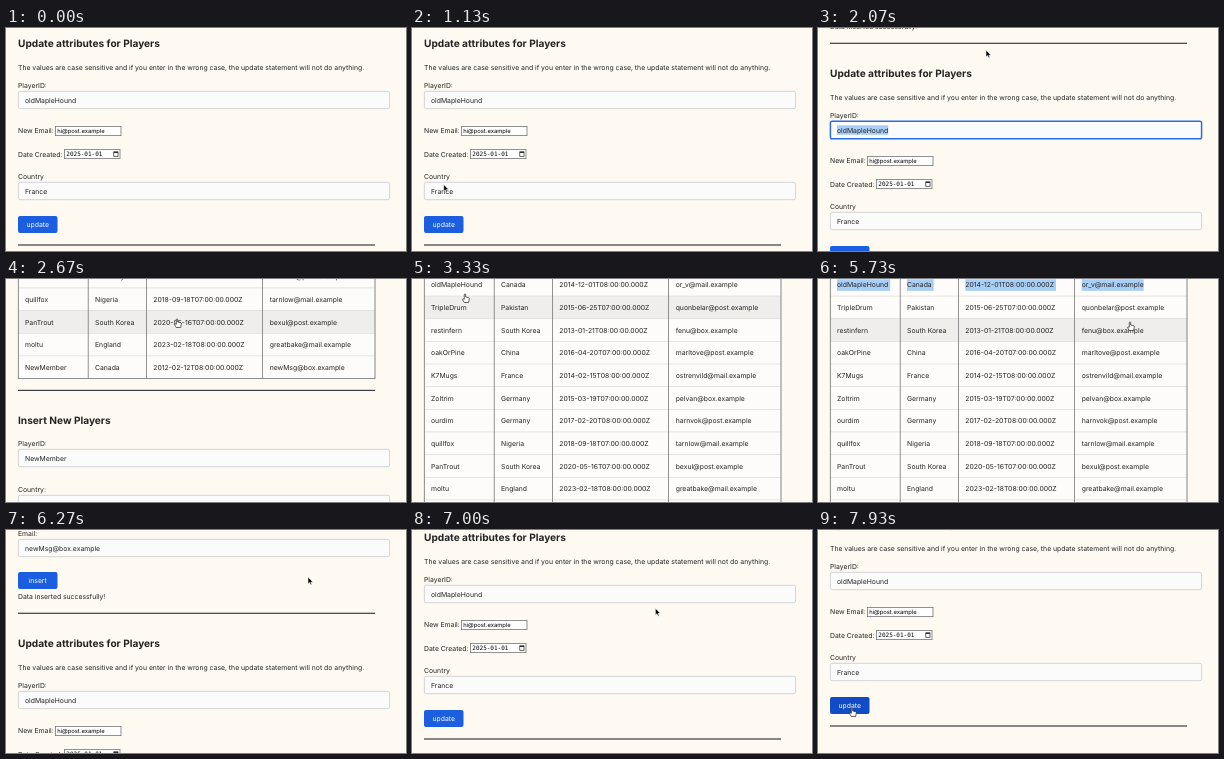
Animation, 400 px wide and 223 px high, one loop 8 s. Source, as an HTML page:

```html
<!DOCTYPE html>
<html lang="en">
<head>
<meta charset="utf-8">
<title>Player admin</title>
<style>
  html, body { margin: 0; width: 100%; height: 100%; overflow: hidden; background: #fefaf1; }
  svg { display: block; width: 100vw; height: 100vh; }
  text { font: 6.84px Inter, "Open Sans", sans-serif; fill: #232323; white-space: pre; text-rendering: geometricPrecision; }
  .title { font-size: 10.15px; font-weight: 700; }
  .small { font-size: 5.85px; fill: #000; }
  .mono { font: 6px "DejaVu Sans Mono", monospace; fill: #000; }
  .caption { fill: #fff; }
</style>
</head>
<body>
<svg id="stage" viewBox="0 0 400 223">
  <g id="page"></g>
  <g id="cursor" stroke-linejoin="round">
    <path id="arrow" d="M0 0V7L1.6 5.6 2.7 8 3.8 7.5 2.8 5.2H5Z" fill="#000" stroke="#fff" stroke-width=".6"/>
    <path id="hand" d="M-.7 .3Q0-.5 .7 .3V3L3.7 3.7Q4.5 4 4.3 5L3.6 8.5H-.7L-2.6 5.4Q-2.4 4.3-.7 5.3Z" fill="#fff" stroke="#222" stroke-width=".7"/>
  </g>
</svg>
<script>
const LOOP = 8000, ROW = 22.65, FIRST_ROW = -511.2;
const SELECTED = '#a9cff7';
const $ = id => document.getElementById(id);
const page = $('page');

function add(tag, attrs, content) {
  const el = document.createElementNS('http://www.w3.org/2000/svg', tag);
  for (const key in attrs) el.setAttribute(key, attrs[key]);
  if (content) el.textContent = content;
  return page.appendChild(el);
}
const box = (x, y, width, height, fill, more) => add('rect', { x, y, width, height, fill, ...more });
const label = (x, middle, content, cls = '') => add('text', { x, y: middle + 2.5, class: cls }, content);
const title = (middle, content) => add('text', { x: 12, y: middle + 3.3, class: 'title' }, content);
const rule = y => box(12, y - .6, 357, 1.2, '#3c3c42');

function field(middle, name, value) {
  label(12, middle, name);
  const frame = box(12.4, middle + 6.3, 371.2, 17.4, '#fbfbfc', { rx: 1.8, stroke: '#cfd0d6', 'stroke-width': .9 });
  const mark = box(19, middle + 10.3, 0, 9.5, SELECTED);
  return { frame, mark, text: label(19, middle + 15, value) };
}
function smallBox(x, middle, width) {
  box(x, middle - 4.6, width, 9.2, '#fff', { stroke: '#777', 'stroke-width': .8 });
}
function dateField(middle, value) {
  label(12, middle, 'Date Created:');
  smallBox(58.5, middle, 55.5);
  add('text', { x: 60.3, y: middle + 2.1, class: 'mono' }, value);
  box(107.8, middle - 2.1, 4.2, 4.4, 'none', { stroke: '#222', 'stroke-width': .7 });
  box(107.8, middle - 2.3, 4.2, 1.2, '#222');
}
function button(top, content) {
  const face = box(12, top, 39.5, 17, '#1b5fe0', { rx: 2 });
  add('text', { x: 31.7, y: top + 10.9, class: 'caption', 'text-anchor': 'middle' }, content);
  return face;
}

const columns = [12.3, 82.2, 140.6, 256.6, 369];
const textX = [19, 89, 147.3, 263.7];
const players = [
  ['oldMapleHound', 'Canada', '2014-12-01T08', 'or_v@mail.example'],
  ['TripleDrum', 'Pakistan', '2015-06-25T07', 'quonbelar@post.example'],
  ['restinfern', 'South Korea', '2013-01-21T08', 'fenu@box.example'],
  ['oakOrPine', 'China', '2016-04-20T07', 'marltove@post.example'],
  ['K7Mugs', 'France', '2014-02-15T08', 'ostrenvild@mail.example'],
  ['Zoltrim', 'Germany', '2015-03-19T07', 'pelvan@box.example'],
  ['ourdim', 'Germany', '2017-02-20T08', 'harnvok@post.example'],
  ['quillfox', 'Nigeria', '2018-09-18T07', 'tarnlow@mail.example'],
  ['PanTrout', 'South Korea', '2020-05-16T07', 'bexul@post.example'],
  ['moltu', 'England', '2023-02-18T08', 'greatbake@mail.example'],
  ['NewMember', 'Canada', '2012-02-12T08', 'newMsg@box.example']
];
const tableTop = FIRST_ROW - ROW / 2, tableEnd = tableTop + ROW * players.length;

const rows = players.map((_, i) =>
  box(12.5, tableTop + i * ROW, 356.5, ROW, '#fdfcfa', { stroke: '#dddcda', 'stroke-width': .6 }));
const cellMarks = textX.map(x => box(x, FIRST_ROW - 5.5, 0, 11.5, SELECTED));
const cells = players.map((player, i) => player.map((value, col) =>
  label(textX[col], FIRST_ROW + i * ROW, col === 2 ? value + ':00:00.000Z' : value)));
columns.forEach(x => box(x - .4, tableTop, .8, tableEnd - tableTop, '#77777a'));
box(11.9, tableEnd - .4, 357.5, .8, '#77777a');

rule(-261.6);
title(-231, 'Insert New Players');
field(-209, 'PlayerID:', 'NewMember');
field(-163, 'Country:', 'Canada');
dateField(-118, '2012-02-12');
field(-95, 'Email:', 'newMsg@box.example');
const insert = button(-56, 'insert');
label(12, -32, 'Data inserted successfully!');

rule(-14.7);
title(16, 'Update attributes for Players');
label(12, 39, 'The values are case sensitive and if you enter in the wrong case, the update statement will not do anything.');
const playerField = field(57, 'PlayerID:', 'oldMapleHound');
label(12, 102.5, 'New Email:');
smallBox(49.5, 103, 65.5);
label(51.2, 102.6, 'hi@post.example', 'small');
dateField(126, '2025-01-01');
field(148, 'Country', 'France');
const update = button(188, 'update');
rule(217);
title(249, 'Player Win Rates');

// [time, page shift]
const scroll = [[0, 0], [1800, 0], [2070, 30], [2400, 330], [2530, 373], [2670, 373], [2900, 455],
  [3330, 517], [5800, 517], [6060, 300], [6270, 98], [6600, 30], [7000, -8], [7300, -21], [LOOP, -21]];
// [time, x, y] of the pointer tip
const pointer = [[0, 164, 48], [70, 164, 48], [400, 120, 110], [890, 18, 195], [1000, 18, 195],
  [1350, 62, 71], [1750, 64, 72], [2070, 168, 22], [2400, 170, 38], [2670, 171, 40], [3000, 120, 30],
  [3330, 53, 15], [3600, 50, 23], [4250, 18, 8], [4450, 18, 8], [5150, 329, 9], [5300, 329, 9],
  [5730, 312, 43], [6270, 302, 47], [6800, 290, 60], [7400, 110, 130], [7870, 34, 178], [LOOP, 34, 178]];

const smooth = u => u * u * (3 - 2 * u);
function sample(track, t, ease = u => u) {
  const i = Math.max(1, track.findIndex(k => k[0] > t));
  const a = track[i - 1], b = track[i];
  const u = ease((t - a[0]) / (b[0] - a[0]));
  return a.slice(1).map((v, n) => v + (b[n + 1] - v) * u);
}

function draw(now) {
  const t = now % LOOP;
  const [shift] = sample(scroll, t);
  const [x, y] = sample(pointer, t, smooth);
  const hotY = y + 3 - shift;
  page.setAttribute('transform', `translate(0 ${shift})`);

  const hovered = x < 369 ? Math.floor((hotY - tableTop) / ROW) : -1;
  rows.forEach((row, i) => row.setAttribute('fill', i === hovered ? '#efeeed' : '#fdfcfa'));
  const over = top => x > 12 && x < 51.5 && hotY > top && hotY < top + 17;
  insert.setAttribute('fill', over(-56) ? '#114cc6' : '#1b5fe0');
  update.setAttribute('fill', over(188) ? '#114cc6' : '#1b5fe0');

  const focused = t >= 1400 && t < 4400;
  playerField.frame.setAttribute('stroke', focused ? '#2a6fdf' : '#cfd0d6');
  playerField.frame.setAttribute('stroke-width', focused ? 1.5 : .9);
  playerField.mark.setAttribute('width', focused ? playerField.text.getComputedTextLength() : 0);

  // The selection includes the gap after every cell but the last.
  const selectEnd = t < 4450 ? 0 : t < 5150 ? x : 400;
  cellMarks.forEach((mark, col) => {
    const full = cells[0][col].getComputedTextLength() + (col < 3 ? 2 : 0);
    mark.setAttribute('width', Math.max(0, Math.min(selectEnd - textX[col], full)));
  });

  const link = (hovered >= 0 && hovered < players.length) || over(-56) || over(188);
  $('cursor').setAttribute('transform', `translate(${x} ${y})`);
  $('cursor').style.display = t < 70 ? 'none' : '';
  $('hand').style.display = link ? '' : 'none';
  $('arrow').style.display = link ? 'none' : '';
}

let start;
function tick(now) {
  start ??= now;
  draw(now - start);
  requestAnimationFrame(tick);
}
draw(0);
requestAnimationFrame(tick);
</script>
</body>
</html>
```
